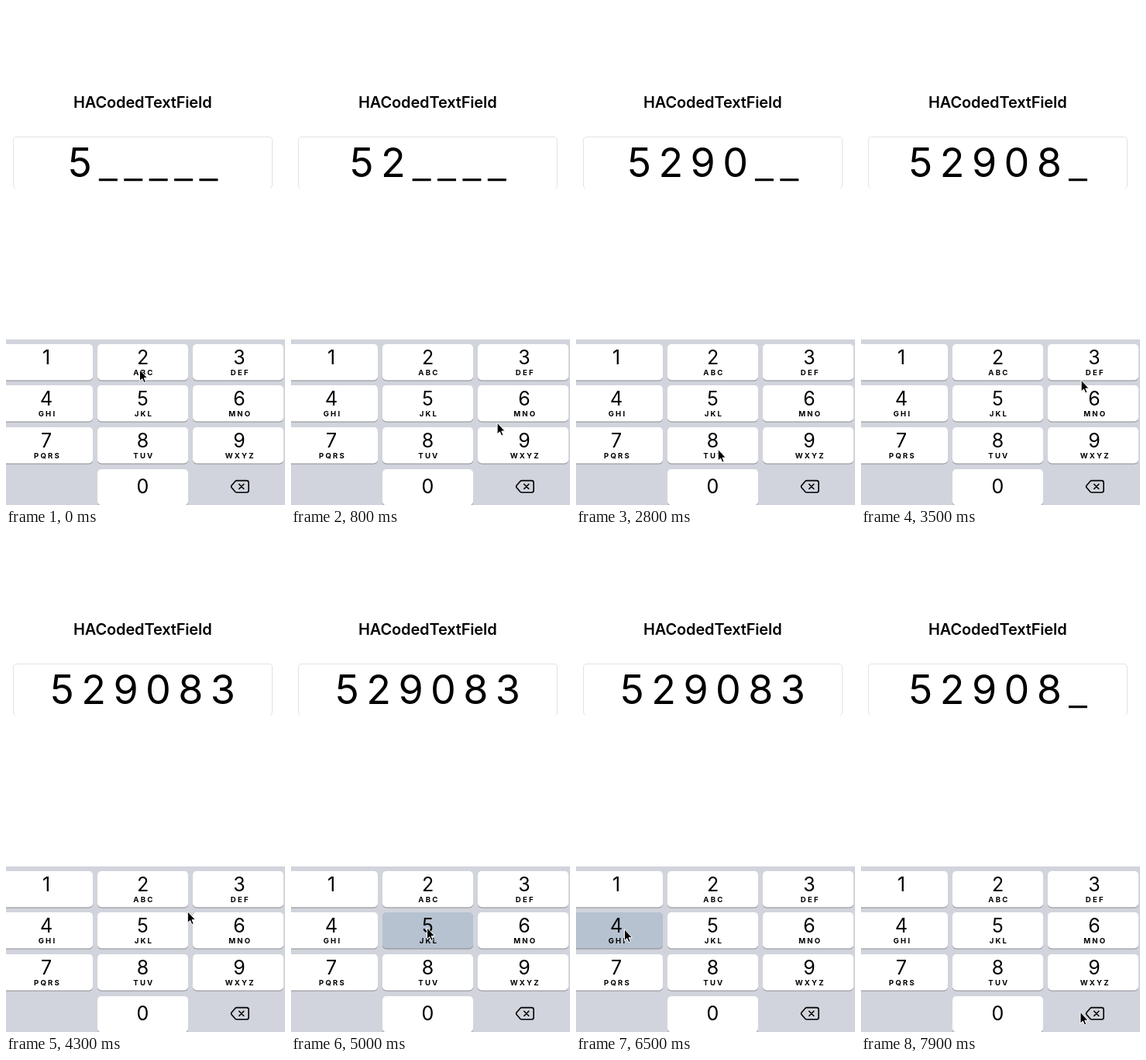
An HTML page that plays this animation: 360x642 px, repeating every 8 s.

```html
<!DOCTYPE html>
<html lang="en">
<head>
<meta charset="utf-8">
<title>HACodedTextField</title>
<style>
  html, body { margin: 0; height: 100%; overflow: hidden; background: #fff; }
  svg { display: block; width: 360px; height: 642px; font-family: Inter, Roboto, sans-serif; text-anchor: middle; }
  .title { font-size: 20px; font-weight: 600; letter-spacing: -.15px; }
  .code { font-size: 52px; }
  .digit { font-size: 25px; }
  .letters { font-size: 9.6px; font-weight: 700; letter-spacing: 2.2px; }
</style>
</head>
<body>
<svg viewBox="0 0 360 642">
  <text class="title" x="176.3" y="130.5">HACodedTextField</text>
  <path d="M12 234.5Q9.5 233.5 9.5 230V173Q9.5 168.5 14 168.5H339Q343.5 168.5 343.5 173V230Q343.5 233.5 341 234.5" fill="none" stroke="#e3e3e3"/>
  <g id="code"></g>
  <rect y="429" width="360" height="213" fill="#d1d4dc"/>
  <g id="keys"></g>
  <g transform="translate(-.5)" fill="none" stroke="#000" stroke-width="1.6" stroke-linecap="round" stroke-linejoin="round">
    <path id="erase" d="M298 610.6H311Q313.6 610.6 313.6 613.2V623.2Q313.6 625.8 311 625.8H298Q297 625.8 296.3 625L291.5 619.4Q290.5 618.2 291.5 617L296.3 611.4Q297 610.6 298 610.6Z"/>
    <path id="cross" d="M301.3 615.2l6 6m0-6l-6 6"/>
  </g>
  <path id="cursor" d="M.5 .8V15.6L3.8 12.5L6 17.6L8.3 16.6L6.2 11.6H10.6Z" stroke="#fff"/>
</svg>
<script>
const LOOP = 8000, STEP = 100, HOLD = 200;
const CENTER = 176.5, DASH = 24, GAP = 9.4;
const $ = id => document.getElementById(id);

function add(parent, tag, attrs, text = '') {
  const el = document.createElementNS('http://www.w3.org/2000/svg', tag);
  for (const name in attrs) el.setAttribute(name, attrs[name]);
  el.textContent = text;
  return parent.appendChild(el);
}

// Keypad
const keys = {};
function addKey(label, col, row, letters) {
  const x = 123 * col - 5, y = Math.round(434.7 + 53.7 * row), center = 52.1 + 124.4 * col;
  const box = { x, y, width: 117, height: 46.4, rx: 5 };
  add($('keys'), 'rect', { ...box, y: y + 1, fill: '#898b90' });
  keys[label] = add($('keys'), 'rect', box);
  add($('keys'), 'text', { class: 'digit', x: center, y: y + (letters === undefined ? 31 : 25.5) }, label);
  if (letters) add($('keys'), 'text', { class: 'letters', x: center + 1.4, y: y + 39.5 }, letters);
}
',ABC,DEF,GHI,JKL,MNO,PQRS,TUV,WXYZ'.split(',')
  .forEach((letters, i) => addKey(i + 1, i % 3, Math.floor(i / 3), letters));
addKey(0, 1, 3);

// Code field: every slot is as wide as its character plus a gap
const slots = [...'529083'].map(digit => {
  const text = add($('code'), 'text', { class: 'code', y: 219.6 }, digit);
  const dash = add($('code'), 'rect', { y: 222, width: DASH, height: 3.2 });
  return { text, dash, width: text.getComputedTextLength() };
});
function drawCode(count) {
  const widths = slots.map((slot, i) => (i < count ? slot.width : DASH - 1) + GAP);
  let x = CENTER - widths.reduce((a, b) => a + b) / 2;
  slots.forEach(({ text, dash }, i) => {
    const middle = x + widths[i] / 2;
    text.setAttribute('x', middle);
    dash.setAttribute('x', middle - DASH / 2);
    text.style.display = i < count ? '' : 'none';
    dash.style.display = i < count ? 'none' : '';
    x += widths[i];
  });
}

// Pointer stops [arrival, x, y, key]; it rests for HOLD, pressing the key if there is one
const stops = [
  [150, 172, 467, 2], [1100, 272, 540, 9], [1600, 204.5, 565.5], [2150, 172, 612, 0],
  [2980, 183, 568.5, 8], [3930, 307, 460, 3], [4850, 175, 507, 5], [5600, 174, 457, 2],
  [6360, 62, 509, 4], [7250, 292, 617, 'erase'], [7900, 282.5, 615.5]
];
function pointerAt(t) {
  const next = stops.findIndex(stop => stop[0] > t);
  if (next === 0) return stops[0].slice(1, 3);
  const [time, x, y] = stops.at(next < 0 ? -1 : next);
  const [time0, x0, y0] = stops.at(next < 0 ? -1 : next - 1);
  const leave = time0 + HOLD;
  const rest = t < leave ? 1 : (1 - (t - leave) / (time - leave)) ** 3;
  return next < 0 ? [x, y] : [x + (x0 - x) * rest, y + (y0 - y) * rest];
}

// Digits are typed on release, as long as there is an empty slot
function countAt(t) {
  return stops.filter(([time, , , key]) => key !== undefined && time + HOLD <= t)
    .reduce((n, [, , , key]) => key === 'erase' ? n - 1 : Math.min(n + 1, slots.length), 1);
}

function draw(now) {
  const t = Math.floor(now % LOOP / STEP) * STEP;
  const held = stops.find(([time]) => time <= t && t < time + HOLD)?.[3];
  for (const label in keys) keys[label].setAttribute('fill', label === String(held) ? '#b6c2d0' : '#fff');
  $('erase').setAttribute('fill', held === 'erase' ? '#000' : 'none');
  $('cross').setAttribute('stroke', held === 'erase' ? '#fff' : '#000');
  drawCode(countAt(t));
  $('cursor').setAttribute('transform', `translate(${pointerAt(t)})`);
}

const start = performance.now();
function tick() {
  draw(performance.now() - start);
  requestAnimationFrame(tick);
}
tick();
</script>
</body>
</html>
```
